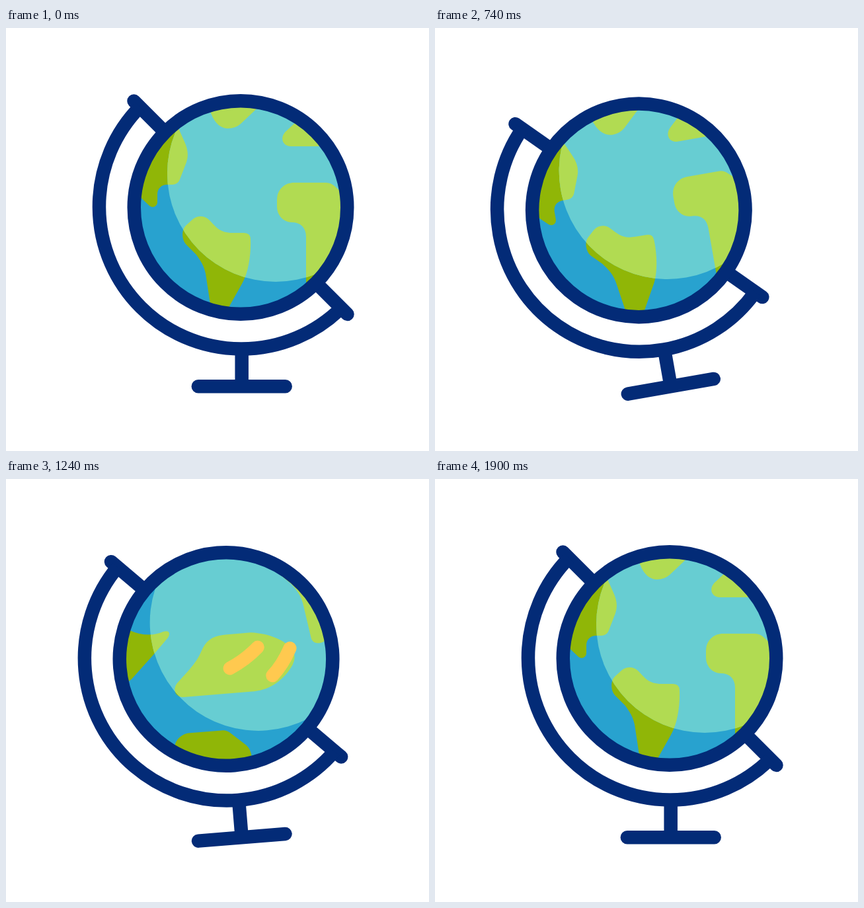
Write an HTML page that moves like this. It is 640 px wide and 640 px high and loops after 2.02 s.

```html
<!DOCTYPE html>
<html lang="en">
<head>
<meta charset="utf-8">
<title>Spinning globe</title>
<style>
  html, body { margin: 0; width: 100%; height: 100%; overflow: hidden; background: #fff; }
  svg { display: block; width: 100vw; height: 100vh; }
  .frame { fill: none; stroke: #032b77; stroke-width: 20.5; stroke-linecap: round; }
  .trail { fill: none; stroke: #ffc94f; stroke-width: 20; stroke-linecap: round; }
</style>
</head>
<body>
<svg viewBox="0 0 640 640">
  <defs>
    <clipPath id="ball"><circle cx="355" cy="271.5" r="155"/></clipPath>
    <clipPath id="glow"><circle cx="408" cy="220" r="164"/></clipPath>
    <g id="land">
      <path d="M272 299 L283 289 C290 283.5 300 283.5 307 290 C318 301 323 310 343 310 H360 Q370 310 370 320 C371 345 366 372 357 387 L334 428 C328 437 311 437 310 424 L303 378 C301 360 293 350 287 342 L272 327 C266 320 265 306 272 299Z"/>
      <path d="M436 234 H484 Q492 234 498 240 L519 259 Q526 266 526 278 V420 H454 V316 C454 302 446 294 432 294 C418 293 410 282 410 270 V260 C410 245 421 234 436 234Z"/>
      <path d="M258 145 L270 172 Q278 189 273 203 L263 229 Q260 237 251 237 H244 C235 237 229 243 229 252 V263 C229 270 222 273 217 269 L150 205 L220 130Z"/>
      <path d="M300 105 L311 131 C316 144 325 152 336 152 Q347 152 355 145 L391 111 L414 88 C420 80 416 76 408 78 Q384 86 358 72 L330 60Z"/>
      <path d="M425 155 L440 141 C458 124 460 117 466 107 C474 94 486 90 502 90 H540 C570 94 592 107 601 122 Q606 132 599 144 C585 165 562 179 538 179 H431 C418 179 413 165 425 155Z"/>
    </g>
    <g id="map">
      <use href="#land"/>
      <use href="#land" x="320" y="-320"/>
    </g>
  </defs>
  <g id="globe">
    <g class="frame">
      <path d="M193.5 110.5 L516.5 433"/>
      <path d="M202.8 119.3 A215.25 215.25 0 0 0 507.2 423.7" stroke-linecap="butt"/>
      <path d="M356.7 490 V542.3 M290.8 542.3 H422.7"/>
    </g>
    <g clip-path="url(#ball)">
      <rect x="195" y="110" width="320" height="320" fill="#28a2cf"/>
      <use class="spin" href="#map" fill="#90b607"/>
      <g clip-path="url(#glow)">
        <rect x="195" y="110" width="320" height="320" fill="#67cdd2"/>
        <use class="spin" href="#map" fill="#b1db52"/>
      </g>
      <path class="trail" id="upper" d="M462 157 C459 165 455 178 452.4 186 C444 215 427 237 404 257.5 C391 269 375 279 359 286 C335 297 310 305 285 310 C275 312.5 265 314 254.5 315.4 C233 317.5 210 318 185 318"/>
      <path class="trail" id="lower" d="M473 207 C469 228 462 245 452.6 262.6 C444.5 278 435 291 423 302 C403 323 380 340 353 351 C340 357 326 361 310.5 364 C298 366.5 285 367.5 272 367.5"/>
    </g>
    <circle class="frame" cx="355" cy="271.5" r="161.25"/>
  </g>
</svg>
<script>
  const LOOP = 2020, STEP = 20, TURN = 320;

  // [time, value] steps
  const tilt = [[200, 0], [730, -10], [1000, 5], [1270, -5], [1540, 2.5], [1810, 0]];
  const spin = [[735, 0], [1815, TURN]];
  const upperHead = [[790, 0], [860, 31], [1240, 171], [1560, 280], [1740, 350]];
  const upperTail = [[820, 0], [860, 16], [1240, 118], [1560, 249], [1780, 350]];
  const lowerHead = [[840, 0], [1780, 280]];
  const lowerTail = [[960, 0], [1900, 280]];
  const lowerEnd = [[1820, 240], [1900, 280]];
  const fade = [[1820, 0], [1900, 1]];

  const linear = x => x;
  const smooth = x => x * x * (3 - 2 * x);

  function at(steps, t, ease) {
    if (t <= steps[0][0]) return steps[0][1];
    for (let i = 1; i < steps.length; i++) {
      const [t0, a] = steps[i - 1], [t1, b] = steps[i];
      if (t < t1) return a + (b - a) * ease((t - t0) / (t1 - t0));
    }
    return steps[steps.length - 1][1];
  }

  const globe = document.getElementById('globe');
  const maps = document.querySelectorAll('.spin');
  const upper = document.getElementById('upper');
  const lower = document.getElementById('lower');

  function drawTrail(path, tail, head, visible) {
    path.style.display = visible ? '' : 'none';
    path.style.strokeDasharray = Math.max(head - tail, 0.01) + ' 9999';
    path.style.strokeDashoffset = -Math.min(tail, path.getTotalLength() - 0.1);
  }

  function mix(from, to, k) {
    return 'rgb(' + from.map((v, i) => Math.round(v + (to[i] - v) * k)) + ')';
  }

  function render(t) {
    globe.setAttribute('transform', `rotate(${at(tilt, t, smooth)} 356.7 542)`);
    const d = at(spin, t, smooth) % TURN;
    maps.forEach(m => m.setAttribute('transform', `translate(${-d} ${d})`));

    drawTrail(upper, at(upperTail, t, linear), at(upperHead, t, linear), t > 790 && t < 1780);
    const tail = Math.min(at(lowerTail, t, smooth), at(lowerEnd, t, linear));
    drawTrail(lower, tail, at(lowerHead, t, smooth), t > 840);
    lower.style.stroke = mix([255, 201, 79], [214, 229, 226], at(fade, t, linear));
  }

  const start = performance.now();
  function tick() {
    const t = (performance.now() - start) % LOOP;
    render(Math.floor(t / STEP) * STEP);
    requestAnimationFrame(tick);
  }
  tick();
</script>
</body>
</html>
```
